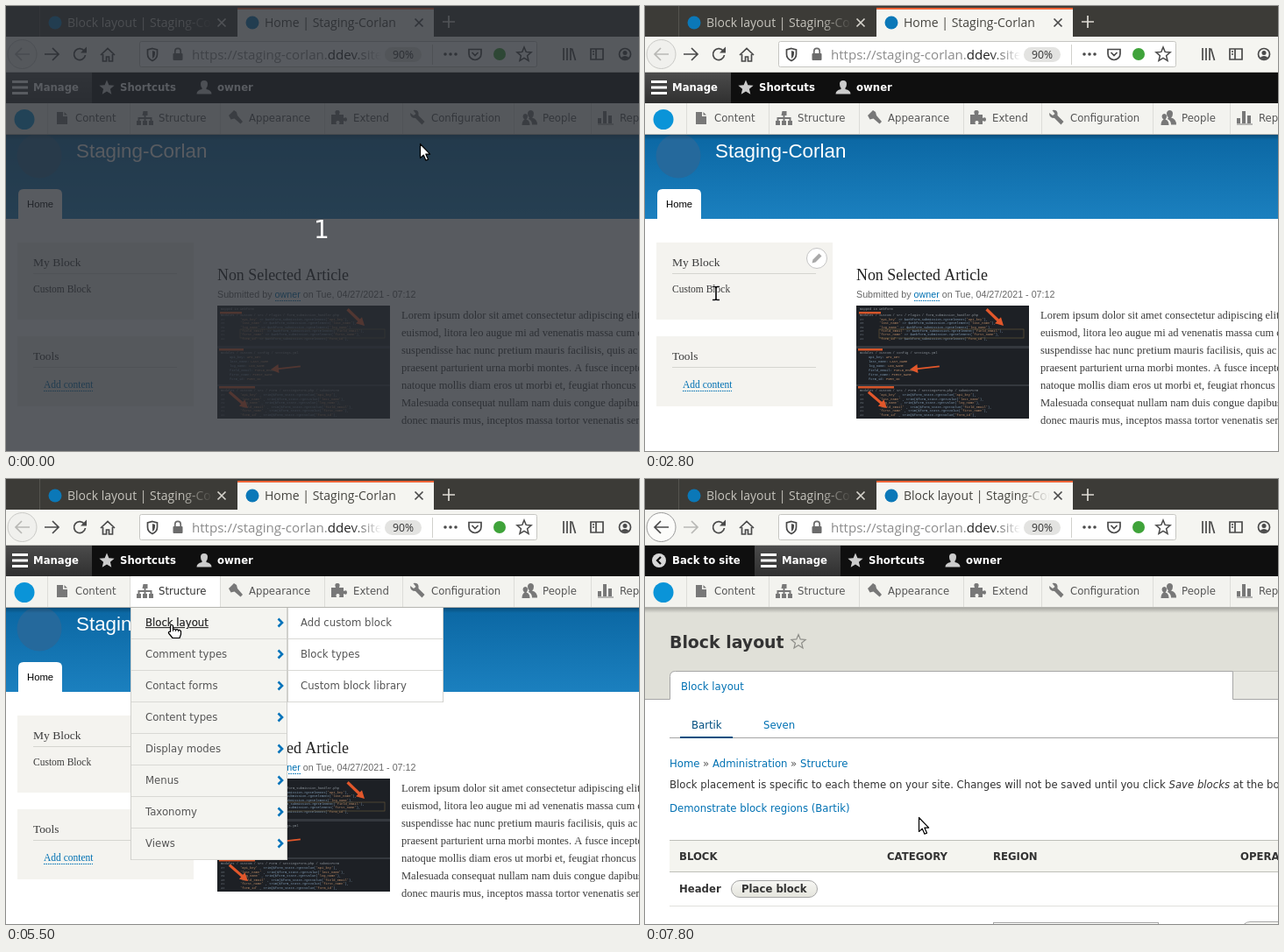
These frames come from a looping animation (722x508 px, 8000 ms). An HTML page:

```html
<!DOCTYPE html>
<html lang="en">
<head>
<meta charset="utf-8">
<title>Block layout menu</title>
<style>
html, body { margin: 0; width: 100%; height: 100%; overflow: hidden; background: #fff; }
svg { display: block; }
text { white-space: pre; }
.ui { font: 11.7px "DejaVu Sans", sans-serif; fill: #565656; }
.bold { font-weight: bold; }
.white { fill: #fff; }
.dark { fill: #333; }
.link { fill: #0071b3; }
.current { fill: #004f80; }
.under { text-decoration: underline; }
.chrome { font: 14px "Open Sans", sans-serif; }
.sans { font-family: "Liberation Sans", sans-serif; }
.serif { font-family: "Liberation Serif", serif; fill: #3b3b3b; }
.flow { font-kerning: none; }
.tiny { font: 3.7px "Liberation Mono", monospace; }
.line { fill: none; stroke: #4a4a4a; stroke-width: 1.7; }
.icon { fill: #787878; }
</style>
</head>
<body>
<svg id="stage" width="722" height="508" viewBox="0 0 722 508"></svg>
<script>
const LOOP = 8000, STEP = 100;
const SITE = 'Staging-Corlan', USER = 'owner';

const text = (cls, x, y, s, more = '') => `<text class="${cls}" x="${x}" y="${y}" ${more}>${s}</text>`;
const rect = (x, y, w, h, fill, more = '') => `<rect x="${x}" y="${y}" width="${w}" height="${h}" fill="${fill}" ${more}/>`;
const disc = (x, y, r, fill, more = '') => `<circle cx="${x}" cy="${y}" r="${r}" fill="${fill}" ${more}/>`;
const line = (d, more = '') => `<path class="line" d="${d}" ${more}/>`;
const fill = (d, color, more = '') => `<path d="${d}" fill="${color}" ${more}/>`;
const shift = (x, y, body) => `<g transform="translate(${x} ${y})">${body}</g>`;
const show = (from, to, body) => `<g data-from="${from}" data-to="${to}">${body}</g>`;
const hline = (x1, x2, y, color) => rect(x1, y, x2 - x1, 1, color);

function star(cx, cy, r, more) {
  const pts = Array.from({ length: 10 }, (_, i) => {
    const a = i * Math.PI / 5, k = i % 2 ? r * 0.45 : r;
    return (cx + k * Math.sin(a)).toFixed(1) + ',' + (cy - k * Math.cos(a)).toFixed(1);
  });
  return `<polygon points="${pts.join(' ')}" ${more}/>`;
}

const gradient = (id, a, b, vertical, from = 1, to = 1) =>
  `<linearGradient id="${id}" x2="${vertical ? 0 : 1}" y2="${vertical ? 1 : 0}">
   <stop stop-color="${a}" stop-opacity="${from}"/><stop offset="1" stop-color="${b}" stop-opacity="${to}"/></linearGradient>`;

const defs = `<defs>
  ${gradient('header', '#0b67a3', '#1b80bf', true)}
  ${gradient('active', '#4b4b4b', '#303030', true)}
  ${gradient('button', '#f7f7f4', '#e4e4dc', true)}
  ${gradient('shadow', '#000', '#000', true, 0.25, 0)}
  ${gradient('fadeDark', '#3c3b37', '#3c3b37', false, 0)}
  ${gradient('fadeLight', '#f5f5f1', '#f5f5f1', false, 0)}
  ${gradient('fadeWhite', '#fff', '#fff', false, 0)}
</defs>`;

// Browser window
function browser() {
  const close = (x, color) => line(`M${x - 4.5} 14.5l9 9m0-9l-9 9`, `style="stroke:${color}"`);
  const back = on => disc(18.5, 55, 16.5, on ? '#fcfcfa' : '#f0f0ed', `stroke="${on ? '#999' : '#c9c9c6'}"`) +
    line('M27 55H11m7-7l-7 7 7 7', on ? '' : 'style="stroke:#b8b8b5"');
  const forward = on => line('M44 55h16m-7-7l7 7-7 7', on ? '' : 'style="stroke:#b8b8b5"');
  const reload = line('M89.5 51.5A6.5 6.5 0 1 0 90.5 56') + fill('M92 46.5v7h-7z', '#4a4a4a');
  const favicon = disc(281, 19, 7.5, '#0b78b8');
  const bug = color => disc(563, 55, 7, color);
  return rect(0, 0, 722, 35, '#3c3b37') + rect(38, 0, 1, 35, '#55534e') +
    disc(56, 19, 7.5, '#0b78b8') + text('chrome', 70, 24, `Block layout | ${SITE}`, 'fill="#c6c4bd"') +
    rect(200, 5, 36, 28, 'url(#fadeDark)') + rect(236, 5, 27, 28, '#3c3b37') + close(246, '#d5d3cc') +
    rect(264, 2, 224, 33, '#f5f5f1') + rect(264, 2, 224, 2, '#ee6437') +
    show(0, 6700, favicon + reload) + show(7300, LOOP, favicon + reload) +
    show(6700, 7300, line('M275 12h12m-12 13h12m-10-13v3l8 7v3m0-13v3l-8 7v3', 'style="stroke:#666"') +
      line('M78.5 49.5l11 11m0-11l-11 11')) +
    show(0, 6900, text('chrome', 295, 24, `Home | ${SITE}`, 'fill="#45443f"')) +
    show(6900, LOOP, text('chrome', 295, 24, `Block layout | ${SITE}`, 'fill="#45443f"') +
      rect(426, 6, 36, 27, 'url(#fadeLight)') + rect(462, 6, 26, 27, '#f5f5f1')) +
    close(471, '#4a4a4a') + line('M498 18h14m-7-7v14', 'style="stroke:#dedcd5"') +
    rect(0, 35, 722, 41, '#f5f5f1') + hline(0, 722, 75, '#c8c8c4') +
    show(0, 6900, back(false) + forward(true)) + show(6900, LOOP, back(true) + forward(false)) +
    show(0, 6700, reload) + show(7300, LOOP, reload) +
    show(6700, 7300, line('M78.5 49.5l11 11m0-11l-11 11')) +
    line('M108 56l8-7.5 8 7.5m-13.5-1v8h4v-5h3v5h4v-8') +
    rect(152.5, 40.5, 453, 29, '#fff', 'rx="2" stroke="#c6c6c2"') +
    line('M167 48.5l5.5 1.5v5q0 5-5.5 7.5-5.5-2.5-5.5-7.5v-5z') + fill('M167 51v9q3-2 3-5v-3z', '#4a4a4a') +
    rect(190.5, 54, 11, 8, '#6b6b6b', 'rx="1"') + line('M192.8 54v-2.5a3.2 3.2 0 0 1 6.4 0v2.5', 'style="stroke:#6b6b6b"') +
    text('chrome', 212, 61, `https://${SITE.toLowerCase()}.<tspan fill="#222">ddev.site</tspan>`, 'fill="#8b8b8b" style="font-size:15.1px"') +
    rect(392, 42, 36, 26, 'url(#fadeWhite)') + rect(428, 42, 50, 26, '#fff') +
    rect(432, 47, 42, 17, '#e3e3e1', 'rx="8.5"') +
    text('chrome', 453, 60, '90%', 'text-anchor="middle" fill="#333" style="font-size:12.2px"') +
    rect(486, 44, 1, 23, '#d0d0cc') +
    [501, 507, 513].map(x => disc(x, 55, 1.8, '#4a4a4a')).join('') +
    line('M528 49.5h14v5a7 7 0 0 1-14 0zm3.5 3.5l3.5 3.5 3.5-3.5') +
    show(0, 6900, bug('#3fa33a')) + show(6900, 7300, bug('#a5a5a2')) + show(7300, LOOP, bug('#3fa33a')) +
    star(591, 55.5, 8.5, 'class="line" style="stroke-width:1.5"') +
    line('M636 48v14m4-14v14m4-14v14m1.5-13.5l4 13.5') +
    line('M667 49h14v12h-14zm6 0v12m-4-9h2m-2 3h2') +
    disc(706, 55, 6.5, 'none', 'class="line"') + disc(706, 53.5, 2.5, '#4a4a4a') + fill('M701.5 59q4.5-4 9 0-4.5 4-9 0z', '#4a4a4a');
}

// Black bar and icon tray
function adminBar(userReady) {
  const person = fill('M0-8a4 4 0 0 1 4 4q0 3-1.5 4.5v1.5q6 1 6 5.5h-17q0-4.5 6-5.5v-1.5q-1.5-1.5-1.5-4.5a4 4 0 0 1 4-4z', '#ccc');
  return rect(0, 76, 98, 35, 'url(#active)') +
    [85, 91.5, 98].map(y => rect(7, y, 18, 3, '#fff')).join('') +
    text('ui bold white', 31, 97, 'Manage') +
    star(115, 93.5, 9, 'fill="#ccc"') + text('ui bold white', 130, 97, 'Shortcuts') +
    shift(226, userReady ? 93 : 88, person) + (userReady ? text('ui bold white', 241, 97, USER) : '');
}

function toolbar() {
  const back = disc(16, 93, 8, '#d8d8d8') + line('M18 89l-4 4 4 4', 'style="stroke:#0f0f0f;stroke-width:2.2"') +
    text('ui bold white', 31, 97, 'Back to site');
  const item = (x, s) => text('ui', x, 132, s);
  const structure = fill('M156.5 120h5v5h-2v2h7v4h1.5v5h-5v-5h1.5v-2h-5v2h1.5v5h-5v-5h1.5v-2h-5v2h1.5v5h-5v-5h1.5v-4h7v-2h-2z', '#787878');
  const active = cls => rect(142, 111, 102, 35, '#fff') + structure + text('ui ' + cls, 174, 132, 'Structure');
  return rect(0, 76, 722, 35, '#0f0f0f') +
    show(0, 6900, adminBar(true)) +
    show(6900, LOOP, back) +
    show(6900, 7200, shift(125, 0, adminBar(false))) + show(7200, LOOP, shift(125, 0, adminBar(true))) +
    rect(0, 147, 722, 6, 'url(#shadow)') +
    rect(0, 111, 722, 36, '#f3f3ef') + hline(0, 722, 146, '#b5b5b0') +
    [47, 141, 244, 363, 452, 579, 667].map(x => rect(x, 111, 1, 35, '#dcdcd8')).join('') +
    disc(21, 129.5, 11.5, '#0a94d8') +
    `<g class="icon">` +
    `<path d="M58 121h7v5h5v9H58zm8.5 0l3.5 3.5h-3.5z"/>` +
    `<path d="M254 125l6-6 3 2 1 4 6 7-2.5 2.5-7-6-4 1z"/>` +
    `<path d="M371 124h5q-2-5 2-5t2 5h5v4q4-2 4 1.5t-4 1.5v4h-5q1.5-4-1.5-4t-1.5 4h-6z"/>` +
    `<path d="M461 122l4 3 2.5-2-3-4q5-1 6 3v3l7 7-3 3.5-7.5-7.5q-6 0-6-6z"/>` +
    `<path d="M598 119a4 4 0 0 1 4 4q0 3-2 4.5 6 1.5 6 8h-6q0-5-4-6.5l1-2q-2-1-2-4a4 4 0 0 1 3-4zM592 123a3 3 0 0 1 3 3q0 2-1.5 3.5 4 1 4 6.5h-9q0-5 3-6.5-2-1.5-2-3.5a3 3 0 0 1 2.5-3z"/>` +
    `<path d="M675 128h4v6h-4zm6-8h4v14h-4zm6 5h4v9h-4zM675 134.5h18v1h-18z"/></g>` + structure +
    item(79, 'Content') + item(174, 'Structure') + item(277, 'Appearance') + item(396, 'Extend') +
    item(485, 'Configuration') + item(612, 'People') + item(700, 'Reports') +
    show(4300, 5200, active('under black')) + show(5200, 6900, active('dark'));
}

// Front page
function codeShot() {
  const names = ['api_key', 'last_name', 'log_name', 'field_email', 'first_name', 'form_id'];
  const dash = (x, y, w) => rect(x, y, w, 2.5, '#d4552a');
  const path = (y, s) => text('tiny', 4, y, s, 'fill="#8d949c"');
  const row = (i, x, y, a) => text('tiny', 4, y, 37 + i, 'fill="#69707a"') +
    text('tiny', x, y, `<tspan fill="#b98a66">'${names[i]}'</tspan> ${a}<tspan fill="#b98a66">'${names[i]}'</tspan>),`, 'fill="#7f9ab3"');
  let s = rect(0, 0, 197, 129, '#1d2025') + rect(0, 46, 197, 3, '#34383e') + rect(0, 90, 197, 2, '#34383e') +
    dash(3, 7, 25) + dash(2, 49, 28) + dash(2, 92, 41) +
    path(5, 'mapped in webform') + path(12, 'modules / custom / src / Plugin / form_submission_handler.php') +
    path(55, 'modules / custom / config / settings.yml') + path(98, 'modules / custom / src / Form / SettingsForm.php / submitForm');
  for (let i = 0; i < 6; i++) {
    s += row(i, 26, 17 + i * 4.3, '=&gt; $webform_submission-&gt;getElement(');
    s += text('tiny', 14, 60 + i * 4.9, `<tspan fill="#7f9ab3">${names[i]}:</tspan> ${names[i].toUpperCase()}`, 'fill="#b98a66"');
    s += row(i, 26, 103 + i * 4.6, ', trim($form_state-&gt;getValue(');
  }
  s += rect(26, 27, 165, 10, 'none', 'stroke="#6d5a3a" stroke-width=".6"');
  const arrow = (x, y, angle, len, w) => `<g transform="translate(${x} ${y}) rotate(${angle})">` +
    fill(`M0 0l-9-5v${5 - w}H${-len}v${2 * w}h${len - 9}v${5 - w}z`, '#e2572b') + '</g>';
  s += arrow(168, 23, 44, 27, 1.6) + arrow(61, 73, 174, 34, 0.9) + arrow(35, 117, 41, 28, 1.6);
  return `<svg x="241" y="342" width="197" height="129">${s}</svg>`;
}

function frontPage() {
  const lorem = [
    'Lorem ipsum dolor sit amet consectetur adipiscing elit',
    'euismod, litora leo augue mi ad venenatis massa cum congue',
    'suspendisse hac nunc pretium mauris facilisis, quis ac',
    'praesent parturient urna morbi montes. A fusce inceptos',
    'natoque mollis diam eros ut morbi et, feugiat rhoncus',
    'Malesuada consequat nullam nam duis congue dapibus',
    'donec mauris mus, inceptos massa tortor venenatis sem'
  ];
  const dots = (x1, x2, y) => line(`M${x1} ${y}H${x2}`, 'style="stroke:#0071b3;stroke-width:1;stroke-dasharray:1.5 1"');
  return rect(0, 147, 722, 361, '#fff') + rect(0, 147, 722, 96, 'url(#header)') +
    disc(38, 171, 25.5, '#25699c') +
    text('sans white', 80, 173, SITE, 'font-size="22.4"') +
    fill('M14 243v-28q0-6 6-6h38q6 0 6 6v28z', '#fff') + text('sans', 24, 230, 'Home', 'font-size="11.3"') +
    rect(13, 270, 201, 88, '#f4f3ef') + rect(13, 377, 201, 80, '#f4f3ef') +
    text('serif', 31, 297, 'My Block', 'font-size="13.5"') + hline(31, 195, 305, '#d5d5d0') +
    text('serif', 31, 327, 'Custom Block', 'font-size="11.5"') +
    text('serif', 31, 404, 'Tools', 'font-size="13.3"') + hline(31, 195, 412, '#d5d5d0') +
    text('serif', 43, 436, 'Add content', 'font-size="11.5" style="fill:#0071b3"') + dots(43, 99, 439.5) +
    show(2000, 3500, disc(196, 288, 11.5, '#fff', 'stroke="#c4c4c4"') +
      fill('M190.5 293.5l1-4 7-7 3 3-7 7z', '#a9a9a9')) +
    text('serif flow', 241, 313, 'Non Selected Article', 'font-size="17.9" style="fill:#222"') +
    text('sans', 241, 333, `Submitted by <tspan fill="#0071b3">${USER}</tspan> on Tue, 04/27/2021 - 07:12`, 'font-size="10.72" fill="#686868"') +
    dots(307, 336, 336.5) + codeShot() +
    lorem.map((s, i) => text('serif flow', 451, 357 + i * 20, s, 'font-size="12.5"')).join('');
}

function menus() {
  const entries = ['Block layout', 'Comment types', 'Contact forms', 'Content types', 'Display modes', 'Menus', 'Taxonomy', 'Views'];
  const chevron = y => line(`M310.5 ${y - 4.5}l4.5 4.5-4.5 4.5`, 'style="stroke:#0073ba;stroke-width:2.6"');
  const panel = (x, w, indent, color, list) => rect(x, 147, w, list.length * 36 - 1, color) +
    list.map((s, i) => hline(x, x + w, 182 + i * 36, '#d9d9d5') + text('ui', x + indent, 168 + i * 36, s)).join('') +
    rect(x, 147, 1, list.length * 36, '#d0d0cc') + rect(x + w - 1, 147, 1, list.length * 36, '#d0d0cc');
  return show(4300, 6900, panel(142, 179, 17, '#f4f4f0', entries) + entries.map((_, i) => chevron(164 + i * 36)).join('')) +
    show(6500, 6900, rect(143, 147, 177, 35, '#a3dee0') + chevron(164)) +
    show(5200, 6900, text('ui under dark', 159, 168, entries[0])) +
    show(5500, 6900, panel(321, 178, 15, '#fff', ['Add custom block', 'Block types', 'Custom block library']));
}

// Block layout page
function blockPage() {
  const link = (x, y, s, cls = '') => text('ui link ' + cls, x, y, s);
  const bold = (x, y, s) => text('ui bold dark', x, y, s);
  const button = (x, y, w, h) => rect(x, y, w, h, 'url(#button)', 'rx="9.5" stroke="#a6a6a6"');
  const edge = d => line(d, 'style="stroke:#a6a6a6;stroke-width:1"');
  const top = h => rect(0, 147, 722, 361, '#fff') + rect(0, 147, 722, h, '#e0e0d8') +
    text('ui bold dark', 28, 193, 'Block layout', 'style="font-size:18.9px"') + hline(0, 722, 146 + h, '#a6a6a6');
  const secondary = link(53, 283, 'Bartik', 'current') + link(135, 283, 'Seven') +
    hline(28, 722, 293, '#a6a6a6') + rect(40, 292, 60, 2, '#004f80');
  const rest = link(28, 327, 'Home') + text('ui', 66, 327, '»') + link(77, 327, 'Administration') +
    text('ui', 166, 327, '»') + link(177, 327, 'Structure') +
    text('ui dark', 28, 351, 'Block placement is specific to each theme on your site. Changes will not be saved until you click <tspan font-style="italic">Save blocks</tspan> at the bottom of the page.') +
    link(28, 378, 'Demonstrate block regions (Bartik)') +
    rect(28, 410, 694, 37, '#f4f4ef') + hline(28, 722, 410, '#bebfb9') + hline(28, 722, 446, '#bebfb9') +
    bold(39, 433, 'BLOCK') + bold(276, 433, 'CATEGORY') + bold(397, 433, 'REGION') + bold(679, 433, 'OPERATIONS') +
    bold(39, 470, 'Header') + button(98.5, 456.5, 98, 19) + bold(110, 470, 'Place block') +
    hline(28, 722, 485, '#e0e0dc') +
    rect(397.5, 504.5, 188, 22, '#fcfcfa', 'stroke="#a6a6a6"') + button(680.5, 503.5, 60, 20);
  const early = top(103) +
    fill('M144.5 249.5v-31h158q6 0 6 6v25z', '#eaeae4', 'stroke="#bcbcb6"') +
    fill('M25.5 250.5v-26q0-6 6-6h107q6 0 6 6v26z', '#fff') + edge('M25.5 249.5v-25q0-6 6-6h107q6 0 6 6v25') +
    link(49, 238, 'Block layout') + link(164.5, 238, 'Custom block library') + secondary + rest;
  const late = top(105) + rect(671, 220, 51, 31, '#e8e8e2') + hline(671, 722, 219, '#c3c3bd') +
    fill('M28.5 252.5v-27q0-6 6-6h636v33z', '#fff') + edge('M28.5 251.5v-26q0-6 6-6h636v32') +
    link(41, 241, 'Block layout') + star(175, 186, 8.5, 'fill="none" stroke="#8d8d88" stroke-width="1.2"') +
    shift(0, 2, secondary + rest);
  return show(6900, 7200, early) +
    show(7200, LOOP, late) + show(7700, 7800, link(28, 380, 'Demonstrate block regions (Bartik)', 'under'));
}

const ink = 'stroke="#000" stroke-width="1.2" stroke-linejoin="round"';
const arrow = fill('M-.5.5v16l3.7-3.4 2.7 6.2 2.6-1.2-2.7-6h4.9z', '#fff', ink);
const beamPath = 'M-4-7.5h3l1 1 1-1h3M0-6.5v13M-4 7.5h3l1-1 1 1h3';
const beam = line(beamPath, 'style="stroke:#fff;stroke-width:3"') + line(beamPath, 'style="stroke:#000;stroke-width:1.6"');
const hand = fill('M-1.5 8V1.5q1.5-2 3 0V6l1.5-.8 1.5.8 1.5-.4 1.5 1 1.5-.2 1.5 1.3v3.5l-1.5 4.3h-8l-4.5-5.5q-.5-2 1.5-1.5z', '#fff', ink) +
  line('M1.5 6v2m3-2v2m3-1.5v2', 'style="stroke:#000;stroke-width:.8"');

const cursor = `<g id="cursor">` +
  show(0, 2500, arrow) + show(2500, 3400, beam) + show(3400, 4300, arrow) + show(4300, 6900, hand) +
  show(6900, 7700, arrow) + show(7700, 7800, hand) + show(7800, LOOP, arrow) + `</g>`;

const countdown = show(0, 100, rect(0, 0, 722, 508, '#292d34', 'opacity=".78"') +
  text('ui white', 360, 265, '1', 'text-anchor="middle" style="font-size:28px"'));

const stage = document.getElementById('stage');
stage.innerHTML = defs + show(0, 6900, frontPage()) + blockPage() + toolbar() + menus() + browser() + countdown + cursor;

// Pointer stops: time, x, y
const stops = [
  [0, 473, 157], [600, 473, 157], [900, 353, 156], [1100, 353, 156], [1200, 347, 156], [1300, 347, 156],
  [2100, 60, 307], [2400, 60, 307], [2600, 91, 294], [2800, 81, 328], [3200, 81, 328], [3600, 208, 244],
  [3700, 208, 244], [4500, 217, 129], [4600, 214, 128], [4700, 214, 128], [4900, 201, 128], [5100, 201, 128],
  [5300, 190, 157], [5400, 190, 157], [5500, 189, 166], [7500, 189, 166], [7600, 200, 260], [7700, 226, 370],
  [7800, 313, 386], [LOOP, 313, 386]
];

function pointerAt(t) {
  const i = stops.findIndex(s => s[0] > t);
  const [t0, x0, y0] = stops[i - 1], [t1, x1, y1] = stops[i];
  const u = (t - t0) / (t1 - t0), k = u * u * (3 - 2 * u);
  return [x0 + (x1 - x0) * k, y0 + (y1 - y0) * k].map(Math.round);
}

const timed = [...stage.querySelectorAll('[data-from]')];
const pointer = document.getElementById('cursor');
const start = performance.now();

function draw(now) {
  const t = Math.floor((Math.max(0, now - start) % LOOP) / STEP) * STEP;
  for (const el of timed) {
    el.style.display = t >= +el.dataset.from && t < +el.dataset.to ? '' : 'none';
  }
  pointer.setAttribute('transform', `translate(${pointerAt(t)})`);
  requestAnimationFrame(draw);
}
draw(start);
</script>
</body>
</html>
```
